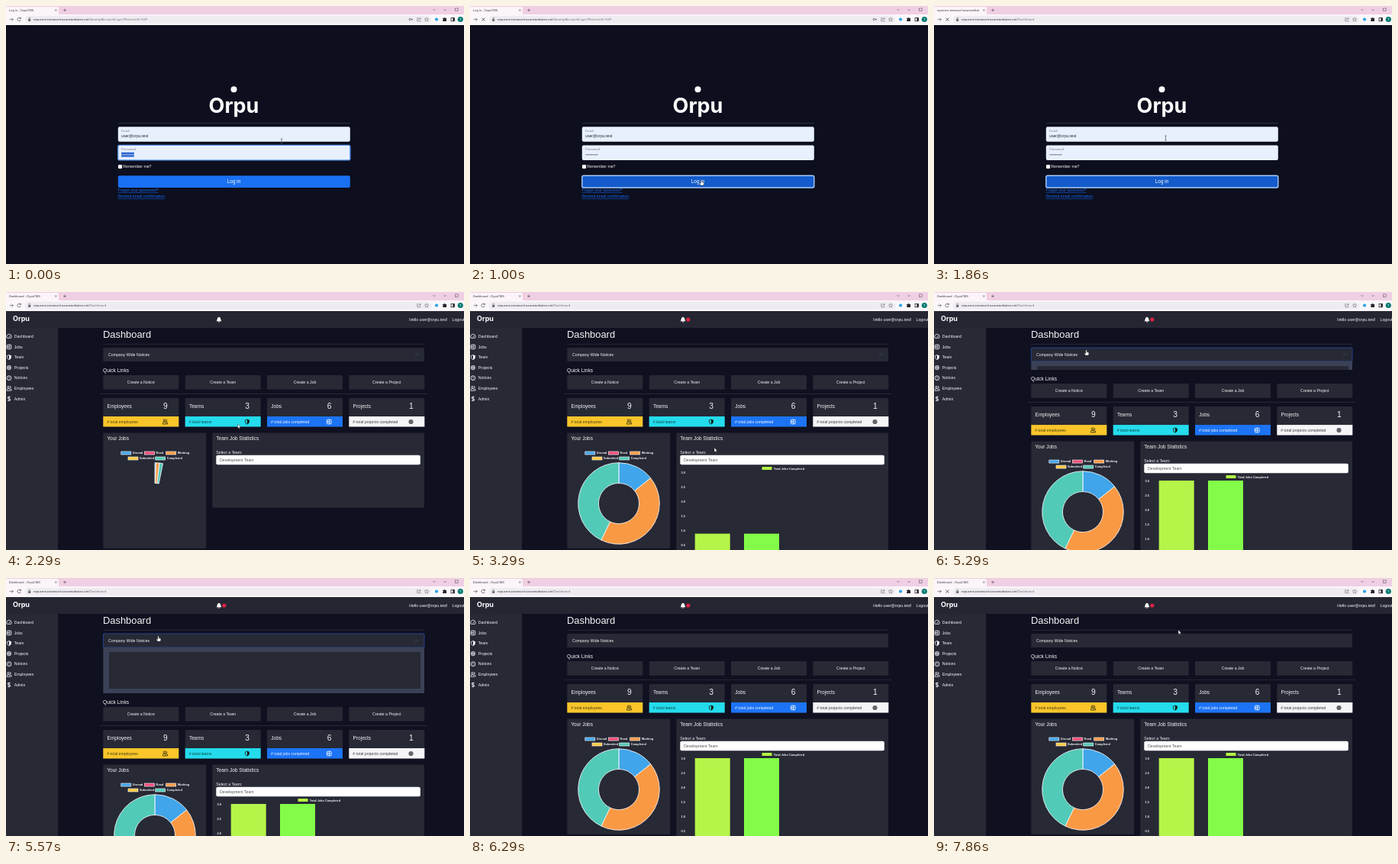
Recreate the animation shown at these times as an HTML page. Size 600x338 px, loop 8000 ms.

```html
<!DOCTYPE html>
<html lang="en">
<head>
<meta charset="utf-8">
<title>OrpuCMS</title>
<style>
  html, body { margin: 0; width: 100%; height: 100%; overflow: hidden; background: #0e0f1e; }
  svg { display: block; width: 100vw; height: 100vh; }
  text { font-family: "Liberation Sans", Arial, sans-serif; white-space: pre; }
  .brand { font-family: Inter, sans-serif; }
</style>
</head>
<body>
<svg id="stage" viewBox="0 0 600 338" preserveAspectRatio="none"></svg>
<script>
const LOOP = 8000;
const PANEL = '#272935', INK = '#f4f4f6';
const BODY_HEIGHT = 60, BASELINE = 350.5, BAR_HEIGHT = 114.5;

// Markup helpers
const rect = (x, y, w, h, fill, extra = '') =>
  `<rect x="${x}" y="${y}" width="${w}" height="${h}" fill="${fill}" ${extra}/>`;
const circle = (x, y, r, fill, extra = '') =>
  `<circle cx="${x}" cy="${y}" r="${r}" fill="${fill}" ${extra}/>`;
const text = (x, y, size, str, fill = INK, extra = '') =>
  `<text x="${x}" y="${y}" font-size="${size}" fill="${fill}" ${extra}>${str}</text>`;
const line = (d, stroke, width = 0.8, extra = '') =>
  `<path d="${d}" fill="none" stroke="${stroke}" stroke-width="${width}" ${extra}/>`;
const group = (id, content, extra = '') => `<g id="${id}" ${extra}>${content}</g>`;
const mid = 'text-anchor="middle"', end = 'text-anchor="end"', bold = 'font-weight="700"';

// Small interface icons, centred on the given point
const icons = {
  gauge: c => line('M-2.6 2A3.2 3.2 0 1 1 2.6 2ZM0 1L1.4-1', c),
  job: c => rect(-2.8, -2.8, 5.6, 5.6, 'none', `stroke="${c}" stroke-width=".9" rx="1"`) +
    line('M-1.4-1V1M.3-2.6V2.6M-2.6 0H1.6', c, 0.7),
  shield: c => line('M0-3L2.6-2V0Q2.4 2.2 0 3.2Q-2.4 2.2-2.6 0V-2Z', c) +
    `<path d="M0-3L2.6-2V0Q2.4 2.2 0 3.2Z" fill="${c}"/>`,
  globe: c => circle(0, 0, 3.1, c, 'opacity=".75"') +
    line('M-3 0H3M0-3V3M-2-2Q0-.6 2-2M-2 2Q0 .6 2 2', '#555862', 0.35),
  notice: c => circle(0, 0, 2.9, 'none', `stroke="${c}" stroke-width=".9"`) + line('M0-1.6V.5M0 1.1V1.8', c),
  people: c => line('M-3 3V1.5Q-3 .2-1 .2Q1 .2 1 1.5V3ZM1.6.3Q3 .5 3 1.6V3H1.8M1-3Q2.6-2.6 2.2-1.2T1-.5', c, 0.75) +
    circle(-1, -1.7, 1.3, 'none', `stroke="${c}" stroke-width=".75"`),
  admin: c => line('M1.8-2Q0-3.2-1.7-2Q-2.4-.4 0 0T1.7 2Q0 3.2-1.9 2M0-3.2V3.2', c, 0.9)
};
const icon = (name, x, y, color = INK) => `<g transform="translate(${x} ${y})">${icons[name](color)}</g>`;

function browser() {
  const grey = '#5d5a62';
  return rect(0, 0, 600, 11, '#f0cfe3') +
    '<path d="M0 1H66Q69 1 69 4V11H0Z" fill="#fbf4f9"/>' +
    rect(0, 11, 600, 14, '#fbf6fa') + rect(25, 12.7, 532, 10, '#eeecf1', 'rx="5"') +
    text(4, 7, 4, '', '#3c3a42', 'id="tab"') +
    line('M64 4.2L66.6 6.8M66.6 4.2L64 6.8', grey, 0.6) +
    line('M77 3.6V7.4M75.1 5.5H78.9', grey, 0.7) +
    line('M559.3 4.2L561 5.8L562.7 4.2M573.5 5H577', grey, 0.6) +
    rect(588.6, 3, 3.5, 3.5, 'none', `stroke="${grey}" stroke-width=".6"`) +
    line('M4.6 17.6H9.4M7.4 15.6L9.4 17.6L7.4 19.6', grey, 0.7) +
    line('M19 16A2.3 2.3 0 1 0 19.4 18.4M19.5 14.8V16.6H17.7', grey, 0.8, 'id="reload"') +
    line('M15.5 15.6L19.5 19.6M19.5 15.6L15.5 19.6', '#35333a', 0.8, 'id="stop"') +
    rect(29.2, 17.2, 3, 2.6, grey) + line('M29.8 17.2V16A.9.9 0 0 1 31.6 16V17.2', grey, 0.5) +
    `<text x="36" y="19.3" font-size="4.4" fill="#34323a">orpucms-tomasvel.azurewebsites.net<tspan id="path" fill="#77747c"></tspan></text>` +
    line('M530.3 17.5H533M532 17.5V18.6', grey, 0.8, 'class="login-only"') +
    circle(529.3, 17.5, 1.2, 'none', `stroke="${grey}" stroke-width=".8" class="login-only"`) +
    line('M540.5 15.6H538.8V19.8H543V18.6M540.2 18.4Q540.6 16.3 543 16.3M542 15L543.4 16.3L542 17.6', grey, 0.55) +
    line('M551 15L551.8 16.8L553.6 17L552.2 18.2L552.7 20L551 19L549.3 20L549.8 18.2L548.4 17L550.2 16.8Z', grey, 0.5) +
    circle(564, 17.6, 2.1, '#2ba3e6') +
    '<path d="M572 16H573.5A1 1 0 0 1 575.5 16H577V20H572V18.7A.8.8 0 0 0 572 17.1Z" fill="#29272d"/>' +
    rect(583, 15.6, 4.5, 4.2, 'none', 'stroke="#29272d" stroke-width=".8"') + rect(585.4, 15.6, 2.1, 4.2, '#29272d') +
    circle(595.3, 17.5, 3.6, '#087b70') + text(595.3, 19, 4, 'T', '#fff', mid);
}

function login() {
  const field = '#e8f0fe', label = '#777d89';
  return rect(0, 25, 600, 313, '#0d0f1e') +
    circle(298.5, 109.3, 4, '#fff') +
    text(298.5, 139.8, 27, 'Orpu', '#fff', `${mid} font-weight="700" class="brand"`) +
    line('M147 153.5H451', '#55565f', 0.7, 'stroke-dasharray="1.5 .8"') +
    rect(146.8, 158.3, 304, 19.5, field, 'rx="2"') +
    text(151, 165.4, 4.4, 'Email', label) + text(151, 172.3, 5.2, 'user@orpu.test', '#252932') +
    rect(146.8, 182.4, 304, 19.5, field, 'id="password" rx="2"') +
    text(151, 189.4, 4.4, 'Password', label) +
    rect(151, 191.7, 16.8, 6, '#2f66cf', 'id="selection"') +
    group('dots', [...Array(9)].map((_, i) => circle(152 + i * 1.85, 194.8, 0.65, 'inherit')).join('')) +
    rect(147, 208, 5, 5, '#fff', 'rx="1"') + text(153.3, 212.4, 5.2, 'Remember me?') +
    rect(146.8, 222.2, 304, 15.8, '#1a70f2', 'id="submit" rx="2"') +
    text(298.5, 232.4, 6.4, 'Log in', '#fff', mid) +
    text(146.5, 243.2, 5.2, 'Forgot your password?', '#1367ee', 'text-decoration="underline"') +
    text(146.5, 251.2, 5.2, 'Resend email confirmation', '#1367ee', 'text-decoration="underline"');
}

function sidebar() {
  const items = [['gauge', 'Dashboard'], ['job', 'Jobs'], ['shield', 'Team'], ['globe', 'Projects'],
    ['notice', 'Notices'], ['people', 'Employees'], ['admin', 'Admin']];
  return rect(0, 47, 68, 291, PANEL) + items.map(([name, label], i) => {
    const y = 58.3 + i * 13.6;
    return icon(name, 4, y) + text(10.7, y + 1.7, 5.2, label);
  }).join('');
}

function cards() {
  const columns = [127.3, 234.7, 342, 449.3], width = 99;
  const links = ['Notice', 'Team', 'Job', 'Project'];
  const stats = [['Employees', 9, 'employees', '#f9c52a', '#4c430f', 'people'], ['Teams', 3, 'teams', '#24dcec', '#0b4650', 'shield'],
    ['Jobs', 6, 'jobs completed', '#1c74f5', '#f2f6ff', 'job'], ['Projects', 1, 'projects completed', '#f5f5f8', '#3a3b42', 'globe']];
  return columns.map((x, i) => {
    const [name, count, unit, fill, ink, mark] = stats[i];
    return rect(x, 109, width, 18.8, PANEL, 'rx="1"') +
      text(x + width / 2, 120.2, 5.2, `Create a ${links[i]}`, INK, mid) +
      rect(x, 139, width, 37.5, PANEL, 'rx="1"') + rect(x, 163, width, 13.5, fill) +
      text(x + 5.3, 152, 6.5, name) + text(x + 81.5, 153, 10.2, count, INK, mid) +
      text(x + 5, 171.7, 5.2, `# total ${unit}`, ink) +
      icon(mark, x + 81.2, 170, mark === 'job' ? '#fff' : mark === 'globe' ? '#3c3d44' : '#16180f');
  }).join('');
}

const slices = [[1, '#40a5ea'], [3, '#f99944'], [3, '#52cab8']];
function jobs() {
  const legend = [[150.8, 211, 'Unread', '#40a5ea'], [181.6, 211, 'Read', '#ee4c78'], [209.7, 211, 'Working', '#f99944'],
    [160, 218, 'Submitted', '#fbc640'], [195.7, 218, 'Completed', '#52cab8']];
  return rect(127.3, 184.5, 135, 151.5, PANEL, 'rx="1"') + text(132.3, 194, 6.5, 'Your Jobs') +
    legend.map(([x, y, name, fill]) => rect(x, y - 2, 13, 4, fill, 'stroke="#fff" stroke-width=".6"') +
      text(x + 15, y + 1.4, 3.9, name, INK, bold)).join('') +
    slices.map(([, fill]) => `<path class="slice" fill="${fill}" stroke="#fff" stroke-width=".8"/>`).join('');
}

function statistics() {
  const ticks = [3, 2.5, 2, 1.5, 1, 0.5];
  return rect(270.3, 184.5, 277.7, 98, PANEL, 'id="teamPanel" rx="1"') +
    text(275.3, 194, 6.5, 'Team Job Statistics') + text(275.3, 211.5, 5.2, 'Select a Team:') +
    rect(275.3, 213.8, 267.5, 12.4, '#fff', 'rx="2"') + text(280, 221.8, 5.2, 'Development Team', '#55575f') +
    group('barChart', rect(382.5, 229, 13, 4, '#b4f444') + text(397.7, 232.7, 3.9, 'Total Jobs Completed', INK, bold) +
      ticks.map((v, i) => text(282, 237.6 + i * 19, 3.9, v.toFixed(1), INK, `${bold} ${end}`)).join('') +
      rect(294.7, 0, 46, 0, '#b5f449', 'class="bar"') + rect(359, 0, 46, 0, '#83fc49', 'class="bar"'));
}

function dashboard() {
  return rect(0, 25, 600, 313, '#0f1020') + sidebar() + rect(0, 25, 600, 22, '#252632') +
    text(9, 38.2, 9, 'Orpu', '#fff', 'font-weight="700" class="brand"') +
    '<path d="M275.6 38.2Q276.8 37 276.8 35Q277 33 279 32.7Q281 33 281.2 35Q281.2 37 282.4 38.2ZM278 38.8H280A1 1 0 0 1 278 38.8Z" fill="#fff"/>' +
    circle(285.8, 36, 2.6, '#dd2340', 'id="badge"') +
    text(578.5, 37.6, 5.2, 'Hello user@orpu.test!', INK, end) + text(584.6, 37.6, 5.2, 'Logout') +
    text(127, 59.5, 12.9, 'Dashboard') + line('M127 68.3H548', '#3b3c49', 0.6) +
    rect(127.3, 73, 420.7, 18, PANEL, 'id="accordion" rx="1"') +
    text(134, 83.9, 5.2, 'Company Wide Notices') +
    line('M535.7 83L537.8 81L539.9 83', '#48536f', 0.7, 'id="chevron"') +
    '<clipPath id="clip"><rect id="clipBox" x="127" y="91" width="421" height="0"/></clipPath>' +
    group('notices', rect(127.3, 91, 420.7, BODY_HEIGHT, '#3b4156') +
      rect(135, 97, 408, BODY_HEIGHT - 12, PANEL), 'clip-path="url(#clip)"') +
    group('content', text(127, 105, 6.6, 'Quick Links') + line('M123 133.4H552', '#3b3c49', 0.6) +
      cards() + jobs() + statistics());
}

function cursors() {
  return group('beam', line('M-1.2-3H1.2M0-3V3M-1.2 3H1.2', '#55565e', 0.7)) +
    group('arrow', '<path d="M0 0V5.6L1.3 4.4L2.2 6.3L3.1 5.9L2.3 4.1H4Z" fill="#fff" stroke="#111" stroke-width=".4"/>') +
    group('hand', '<path d="M-.7 0Q0-.6.7 0V2.6L3 3.3Q3.5 3.6 3.4 4.6L2.8 7H-.9L-2.6 4.4Q-2.3 3.6-1.5 4.1L-.7 4.7Z" fill="#fff" stroke="#111" stroke-width=".4"/>');
}

const stage = document.getElementById('stage');
stage.innerHTML = group('login', login()) + group('dashboard', dashboard()) + browser() + group('cursor', cursors());

const $ = id => document.getElementById(id);
const all = selector => [...stage.querySelectorAll(selector)];
const show = (el, on) => el.setAttribute('display', on ? 'inline' : 'none');
const set = (id, attrs) => Object.entries(attrs).forEach(([k, v]) => $(id).setAttribute(k, v));

const clamp = v => Math.min(1, Math.max(0, v));
const span = (t, start, length) => clamp((t - start) / length);
const smooth = v => v * v * (3 - 2 * v);
const outQuart = v => 1 - (1 - v) ** 4;

// Time, x, y
const track = [[0, 361, 177], [300, 361, 177], [860, 303, 228], [1150, 303, 228], [1750, 303.5, 173], [2350, 303.5, 173],
  [3000, 320, 204], [4140, 320, 204], [4650, 199.5, 76], [5850, 199.5, 76], [6200, 286, 36], [6750, 286, 36],
  [7400, 320, 68], [LOOP, 320, 68]];
function pointer(t) {
  const i = track.findIndex(p => p[0] > t);
  const [t0, x0, y0] = track[i - 1], [t1, x1, y1] = track[i];
  const k = smooth((t - t0) / (t1 - t0));
  return [x0 + (x1 - x0) * k, y0 + (y1 - y0) * k];
}

function ringPath(from, to) {
  const at = (angle, r) => `${195 + r * Math.sin(angle)} ${277 - r * Math.cos(angle)}`;
  const large = to - from > Math.PI ? 1 : 0;
  return `M${at(from, 53.3)}A53.3 53.3 0 ${large} 1 ${at(to, 53.3)}L${at(to, 26.5)}A26.5 26.5 0 ${large} 0 ${at(from, 26.5)}Z`;
}

function render(t) {
  const inside = t >= 2200, pressed = t >= 1000;
  const loading = (pressed && !inside) || t >= 7700;
  show($('login'), !inside);
  show($('dashboard'), inside);
  show($('stop'), loading);
  show($('reload'), !loading);
  all('.login-only').forEach(el => show(el, t < 1700));
  $('path').textContent = t < 1700 ? '/Identity/Account/Login?ReturnUrl=%2F' : '/Dashboard';
  $('tab').textContent = inside ? 'Dashboard - OrpuCMS' : t < 1700 ? 'Log in - OrpuCMS' : 'orpucms-tomasvel.azurewebsit';

  show($('selection'), !pressed);
  set('dots', { fill: pressed ? '#252932' : '#fff' });
  set('password', { stroke: pressed ? 'none' : '#5f9cf5', 'stroke-width': 1.4 });
  set('submit', { fill: pressed ? '#145bcb' : '#1a70f2', stroke: pressed ? '#a9cdfd' : 'none', 'stroke-width': 1.4 });

  const open = BODY_HEIGHT * (smooth(span(t, 5195, 350)) - smooth(span(t, 5850, 350)));
  set('clipBox', { height: open });
  set('content', { transform: `translate(0 ${open})` });
  set('accordion', { stroke: t >= 5150 && t < 6200 ? '#2850a8' : 'none', 'stroke-width': 0.8 });
  show($('chevron'), t < 5850);
  show($('badge'), t >= 2700);

  const turn = 2 * Math.PI * 0.9999 * outQuart(span(t, 2283, 1000)) / 7;
  let sum = 0;
  all('.slice').forEach((el, i) => {
    el.setAttribute('d', ringPath(sum * turn, (sum + slices[i][0]) * turn));
    sum += slices[i][0];
  });

  const charted = t >= 3200, height = BAR_HEIGHT * outQuart(span(t, 3207, 1000));
  show($('barChart'), charted);
  set('teamPanel', { height: charted ? 190 : 98 });
  all('.bar').forEach(el => {
    el.setAttribute('y', BASELINE - height);
    el.setAttribute('height', height);
  });

  const [x, y] = pointer(t);
  const overButton = !inside && y > 222, overNotices = t > 4500 && t < 5980;
  const kind = overButton || overNotices ? 'hand' : inside ? 'arrow' : 'beam';
  set('cursor', { transform: `translate(${x} ${y})` });
  ['beam', 'arrow', 'hand'].forEach(name => show($(name), name === kind));
  show($('cursor'), t < 6200 || t > 6750);
}

const begin = performance.now();
function tick() {
  render((performance.now() - begin) % LOOP);
  requestAnimationFrame(tick);
}
tick();
</script>
</body>
</html>
```
